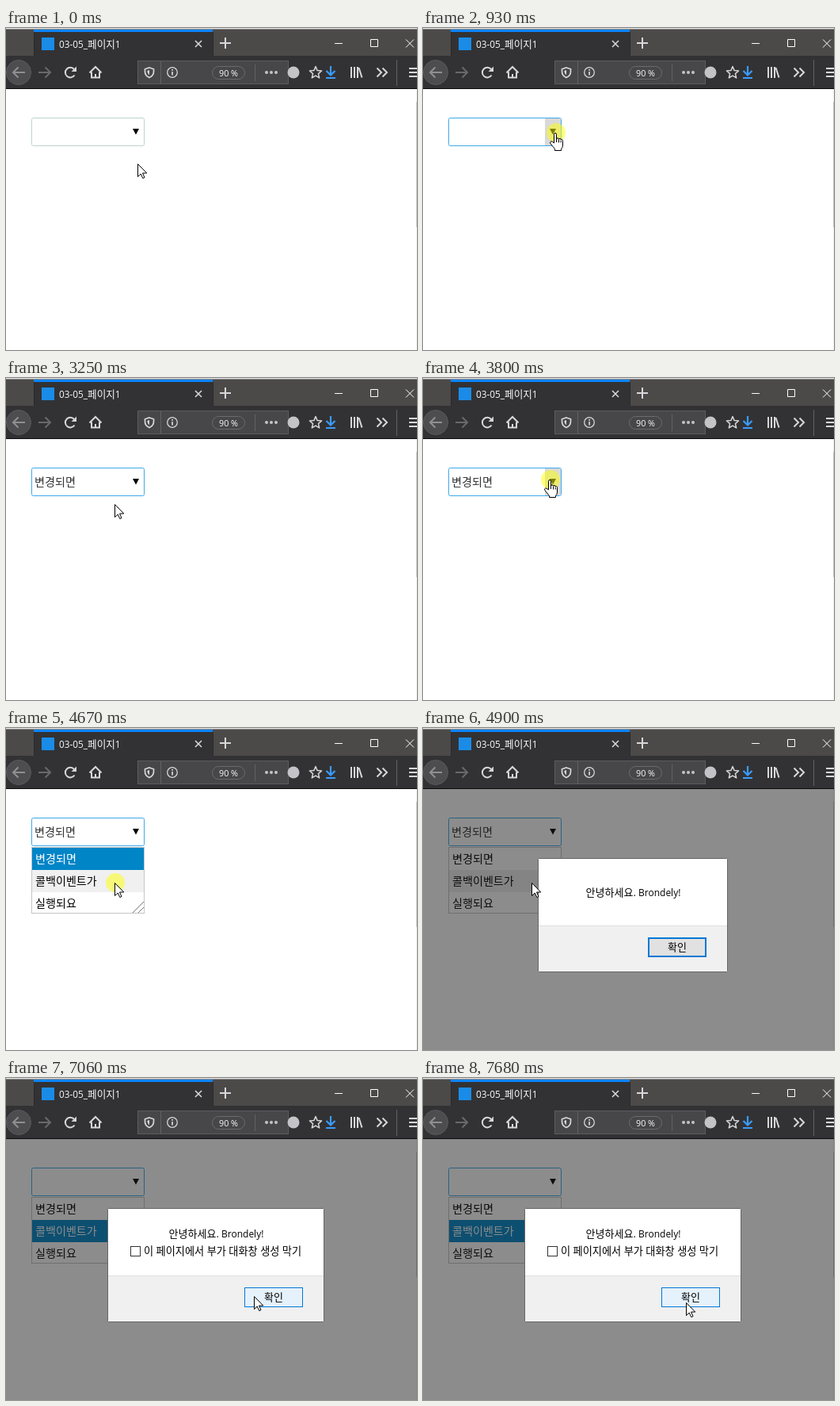
Write an HTML page that moves like this. It is 519 by 406 pixels and loops after 8000 ms.

```html
<!DOCTYPE html>
<html lang="ko">
<head>
<meta charset="utf-8">
<title>Dropdown callback</title>
<style>
  html, body { margin: 0; width: 100%; height: 100%; overflow: hidden; background: #fff; }
  svg { display: block; }
  text { font: 13px "Open Sans", "Noto Sans CJK KR", sans-serif; }
  .latin { font-size: 12px; }
  .list text { font-size: 14.1px; }
  .line { fill: none; stroke: #d7d7db; stroke-width: 2; }
  .thin { fill: none; stroke: #fff; stroke-width: 1; }
  .rule { stroke: #626264; }
</style>
</head>
<body>
<svg width="519" height="406" viewBox="0 0 519 406">
  <!-- title bar -->
  <rect width="519" height="36" fill="#4c4a48"/>
  <rect width="519" height="1" fill="#e3e3e3"/>
  <rect y="1" width="519" height="1" fill="#8c8b8a"/>
  <rect y="35" width="519" height="42" fill="#323234"/>
  <rect x="35" y="2" width="226" height="34" fill="#323234"/>
  <path d="M35.5 5V35M261.5 5V35" stroke="#2a2a2b"/>
  <rect x="35" y="2" width="226" height="3" fill="#0a84ff"/>
  <rect x="45" y="12" width="16" height="16" fill="#1a8ce8"/>
  <text x="67" y="25" fill="#f9f9fa" style="font-size:12.6px"><tspan style="font-size:11.8px">03-05_</tspan>페이지<tspan style="font-size:11.8px">1</tspan></text>
  <path class="line" d="M239 16l8 8M247 16l-8 8" style="stroke-width:1.6"/>
  <path class="line" d="M270 19H284M277 12V26"/>
  <path class="thin" d="M415 19.5H425M460.5 14.5h9v9h-9zM505 14.5l10 10M515 14.5l-10 10"/>

  <!-- toolbar -->
  <circle cx="16" cy="56" r="15.5" fill="#4d4d4f" stroke="#5a5a5c"/>
  <path class="line" d="M24 56H9M15.5 49.5L9 56l6.500 6.500" style="stroke:#8f8f92"/>
  <path class="line" d="M41 56H56M49.500 49.500L56 56l-6.500 6.500" style="stroke:#69696c"/>
  <path class="line" d="M86.500 59.500A6.300 6.300 0 1 1 86 52"/>
  <path d="M89 48.500V55H82.500z" fill="#d7d7db"/>
  <path class="line" d="M105.500 56.500L113 49l7.500 7.500M108 55.500V62.500H118V55.500M113 63V58"/>
  <rect x="166.500" y="41.500" width="190" height="29" fill="#474749" stroke="#5c5c5e"/>
  <path class="line" d="M181 50L186.500 51.800V55Q186.500 60 181 62.500Q175.500 60 175.500 55V51.800Z" style="stroke-width:1.700"/>
  <path d="M181 53V59.500Q178.500 58 178.300 54z" fill="#d7d7db"/>
  <path class="rule" d="M195.500 42V70M314.500 46V67M493.500 40V73"/>
  <circle class="line" cx="210" cy="56" r="6.300" style="stroke-width:1.300"/>
  <path d="M209.200 52h1.700v1.700h-1.700zM209.200 55h1.700v4.500h-1.700z" fill="#d7d7db"/>
  <rect x="260.500" y="48.500" width="41" height="16" rx="8" fill="#474749" stroke="#6b6b6d"/>
  <text x="281" y="60.500" text-anchor="middle" fill="#f9f9fa" style="font-size:10.800px">90 %</text>
  <g fill="#c4c4c8">
    <circle cx="329" cy="56" r="2"/><circle cx="335" cy="56" r="2"/><circle cx="341" cy="56" r="2"/>
    <circle cx="363" cy="56" r="7.500"/>
  </g>
  <path id="star" class="line" style="stroke-width:1.500;stroke-linejoin:round"/>
  <path d="M410 48V58M404.500 54l5.500 5.500l5.500-5.500M404 63H416" fill="none" stroke="#3a9bff" stroke-width="2.200"/>
  <path class="line" d="M436 49V63M440 49V63M444 49V63M445.500 50L449.500 62.500"/>
  <path class="line" d="M468.500 50.500L474 56l-5.500 5.500M475.500 50.500L481 56l-5.500 5.500"/>
  <path class="line" d="M509 51H519M509 56H519M509 61H519"/>
  <rect y="76" width="519" height="1" fill="#0c0c0d"/>

  <!-- page -->
  <rect y="77" width="519" height="329" fill="#fff"/>
  <rect x="518" y="77" width="1" height="329" fill="#f0f0f0"/>
  <rect x="518" y="93" width="1" height="158" fill="#c1c1c1"/>
  <g class="list">
    <rect id="field" x="32.500" y="113.500" width="142" height="35" rx="2" fill="#fff"/>
    <rect id="hot" x="154" y="114" width="20" height="34" fill="#d9d9d9"/>
    <path d="M160 127H168L164 134.500Z"/>
    <text id="value" x="36" y="136" fill="#333">변경되면</text>
    <g id="menu">
      <rect x="32.500" y="150.500" width="142" height="83" fill="#fff" stroke="#c5c5c5"/>
      <g id="rows"></g>
      <path d="M160 233L174 219M167 233L174 226" stroke="#777"/>
    </g>
  </g>

  <!-- dialog -->
  <g id="dialog">
    <rect y="77" width="519" height="329" fill="#1a1a1a" opacity=".5"/>
    <rect id="frame" y="164.500" height="143" rx="1" fill="#fff" stroke="#666"/>
    <rect id="foot" y="249" height="58" fill="#f0f0f0"/>
    <rect id="edge" y="249" height="1" fill="#dfdfdf"/>
    <text id="msg" x="265.500" text-anchor="middle">안녕하세요.<tspan class="latin"> Brondely!</tspan></text>
    <g id="block">
      <rect x="157.500" y="212.500" width="12" height="12" fill="#fff" stroke="#333"/>
      <text x="174" y="223" style="font-size:13.200px">이 페이지에서 부가 대화창 생성 막기</text>
    </g>
    <rect id="ok"/>
    <text id="okText" y="281" text-anchor="middle">확인</text>
  </g>

  <circle id="click" r="12" fill="#ff0" opacity=".5"/>
  <path id="arrow" fill="#fff" stroke="#000" d="M.5 .5V16.500L4.200 13L6.800 18.500L9 17.500L6.500 12H11.800Z"/>
  <path id="hand" fill="#fff" stroke="#000" d="M5.500 13V2.300Q5.500 .5 7 .5T8.500 2.300V8.300Q8.500 6.700 10 6.800T11.500 8.600Q11.600 7.200 13 7.400T14.200 9.300Q14.400 8.200 15.500 8.500T16.500 10.500V16Q16.500 18.500 14.500 20.500V22.500H6.500V20.500L1 13.800Q-.2 11.500 1.500 11Q3 10.600 5.500 13ZM8.500 8V12M11.500 9V12.500M14.200 10V12.500"/>
</svg>
<script>
const LOOP = 8000;
const $ = id => document.getElementById(id);
const set = (el, attrs) => { for (const k in attrs) el.setAttribute(k, attrs[k]); };
const show = (el, on) => { el.style.display = on ? '' : 'none'; };

// Pointer moves: first step, last step, number of steps, end position
const moves = [
  [70, 530, 7, 167, 132],
  [1170, 1170, 1, 166, 132],
  [1860, 2010, 3, 136, 157],
  [2170, 2170, 1, 135, 161],
  [3250, 3650, 6, 160, 128],
  [4120, 4420, 5, 137, 195],
  [6060, 6290, 4, 311, 275],
  [6980, 7530, 8, 326, 272],
  [7610, 7680, 2, 332, 283]
];
const clicks = [[850, 1000], [2470, 2640], [3800, 3950], [4670, 4900], [6750, 6830]];
const FOCUS = 930, OPEN = 1000, PICK = 2640, REOPEN = 3950, ALERT = 4900, ALERT2 = 6910;

const star = Array.from({ length: 10 }, (_, i) => {
  const r = i % 2 ? 3.6 : 8, a = i * Math.PI / 5;
  return `${391 + r * Math.sin(a)} ${56.5 - r * Math.cos(a)}`;
});
set($('star'), { d: `M${star.join('L')}Z` });

const rows = ['변경되면', '콜백이벤트가', '실행되요'].map((label, i) => {
  const add = (tag, attrs) => {
    const el = document.createElementNS('http://www.w3.org/2000/svg', tag);
    set(el, attrs);
    return $('rows').appendChild(el);
  };
  const y = 151 + 28 * i;
  const back = add('rect', { x: 33, y, width: 141, height: i < 2 ? 28 : 26 });
  const text = add('text', { x: 37, y: y + 19 });
  text.textContent = label;
  return { back, text };
});

function pointer(t) {
  let x = 166, y = 171;
  for (const [a, b, n, toX, toY] of moves) {
    if (t < a) break;
    const step = n < 2 ? 1 : Math.min(n, Math.floor((t - a) / (b - a) * (n - 1) + 0.02) + 1);
    const p = step / n, e = p * p * (3 - 2 * p);
    x += (toX - x) * e;
    y += (toY - y) * e;
  }
  return [Math.round(x), Math.round(y)];
}

function drawDialog(t, x, y, pressed) {
  const again = t >= ALERT2;
  const left = again ? 128 : 145, width = again ? 273 : 239, btn = again ? 301 : 284;
  set($('frame'), { x: left + 0.5, width });
  set($('foot'), { x: left + 1, width: width - 1 });
  set($('edge'), { x: left + 1, width: width - 1 });
  set($('msg'), { y: again ? 201 : 212 });
  show($('block'), again);
  const over = x >= btn && x < btn + 74 && y >= 264 && y < 289;
  const [fill, stroke, w] = pressed ? ['#cce4f7', '#005499', 1]
    : over ? ['#e5f1fb', '#0078d7', 1] : ['#e1e1e1', '#0078d7', 2];
  set($('ok'), {
    x: btn + w / 2, y: 264 + w / 2, width: 74 - w, height: 25 - w,
    fill, stroke, 'stroke-width': w
  });
  set($('okText'), { x: btn + 37 });
}

function draw(t) {
  const [x, y] = pointer(t);
  const modal = t >= ALERT;
  const open = t >= OPEN && t < PICK || t >= REOPEN;
  const clicking = clicks.some(([a, b]) => t >= a && t < b);
  const hot = !modal && x >= 154 && x < 174 && y >= 114 && y < 148;

  set($('field'), { stroke: t >= FOCUS ? '#3da9ea' : '#bdd3ce' });
  show($('hot'), hot);
  show($('value'), t >= PICK && t < ALERT2);
  show($('menu'), open);

  const hover = modal ? 1 : x < 174 ? Math.floor((y - 151) / 28) : -1;
  const selected = t >= ALERT2 ? 1 : t >= REOPEN && !modal ? 0 : -1;
  rows.forEach(({ back, text }, i) => {
    set(back, { fill: i === selected ? '#0085c7' : i === hover ? '#f0f0f0' : '#fff' });
    set(text, { fill: i === selected ? '#fff' : '#000' });
  });

  show($('dialog'), modal);
  if (modal) drawDialog(t, x, y, clicking);

  show($('click'), clicking);
  set($('click'), { cx: x + 1, cy: y });
  show($('arrow'), !hot);
  show($('hand'), hot);
  set($('arrow'), { transform: `translate(${x} ${y})` });
  set($('hand'), { transform: `translate(${x - 7} ${y})` });
}

const start = performance.now();
function tick() {
  draw((performance.now() - start) % LOOP);
  requestAnimationFrame(tick);
}
tick();
</script>
</body>
</html>
```
